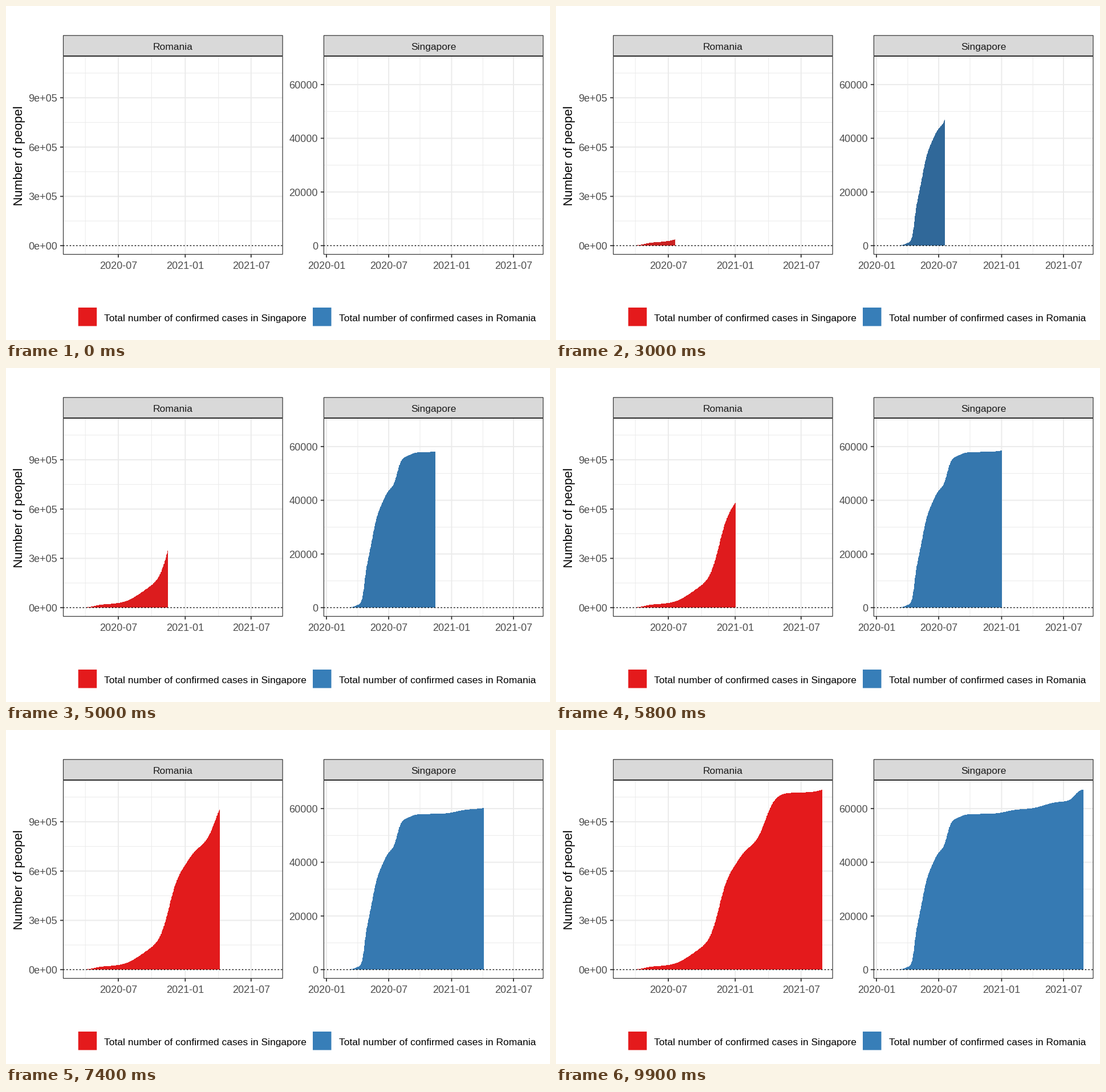
These frames come from a looping animation (954 px wide and 587 px high, 10000 ms). A matplotlib script:

```python
import numpy as np
import matplotlib.pyplot as plt
from matplotlib.animation import FuncAnimation
from matplotlib.patches import Polygon, Rectangle

W, H, DPI = 954, 587, 64
FRAMES, INTERVAL = 100, 100
FIRST_DAY, LAST_DAY = 22, 605            # days since 2020-01-01
START, DAYS_PER_FRAME = 23.3, 5.913
BASE_Y = 421.2
STRIP_TOP, STRIP_BOTTOM = 51.8, 87.5
PANEL_TOP, PANEL_BOTTOM, PANEL_WIDTH = 88.5, 436.5, 384.6
RED, BLUE = "#E41A1C", "#377EB8"
INK, AXIS_TEXT, GRID = "#333333", "#4D4D4D", "#EBEBEB"
HALF_YEARS = {"2020-01": 0, "2020-07": 182, "2021-01": 366, "2021-07": 547}

plt.rcParams["font.family"] = "Liberation Sans"
fig = plt.figure(figsize=(W / DPI, H / DPI), dpi=DPI, facecolor="white")
ax = fig.add_axes([0, 0, 1, 1])
ax.set_xlim(0, W)
ax.set_ylim(H, 0)
ax.axis("off")


def pt(px):
    return px * 72 / DPI


def line(x0, y0, x1, y1, color, width, z, **kw):
    ax.plot([x0, x1], [y0, y1], color=color, lw=pt(width), zorder=z,
            solid_capstyle="butt", snap=False, **kw)


def label(x, y, s, size=18, color=AXIS_TEXT, ha="center", **kw):
    ax.text(x, y, s, fontsize=pt(size), color=color, ha=ha, va="baseline",
            zorder=8, **kw)


def box(x0, y0, x1, y1, **kw):
    ax.add_patch(Rectangle((x0, y0), x1 - x0, y1 - y0, zorder=6, snap=False,
                           **kw))


def total_cases(waves):
    """Sum of logistic waves, each (thousands of cases, middle day, spread)."""
    days = np.arange(FIRST_DAY, LAST_DAY + 1)
    return sum(size / (1 + np.exp((mid - days) / spread))
               for size, mid, spread in waves)


class Panel:
    def __init__(self, left, title, waves, x0, per_day, per_k, color, dark):
        self.left, self.right = left, left + PANEL_WIDTH
        self.x0, self.per_day = x0, per_day
        self.color, self.dark = np.array(color) / 255, np.array(dark) / 255
        self.tops = np.round(BASE_Y - total_cases(waves) * per_k)
        self.area = Polygon(np.zeros((3, 2)), closed=True, lw=0,
                            antialiased=False, zorder=3)
        ax.add_patch(self.area)
        box(left, STRIP_TOP, self.right, STRIP_BOTTOM, fc="#D9D9D9", ec=INK,
            lw=pt(1.2))
        box(left, PANEL_TOP, self.right, PANEL_BOTTOM, fc="none", ec=INK,
            lw=pt(1.2))
        label((left + self.right) / 2, 77, title, 17.4, "#1A1A1A")
        line(left, BASE_Y, self.right, BASE_Y, "black", 1.5, 4,
             ls=(0, (1.3, 2.5)), dash_capstyle="butt")

    def x(self, day):
        return self.x0 + self.per_day * day

    def grid_y(self, step, names):
        for k, name in enumerate(names):
            y = BASE_Y - step * k
            line(self.left, y, self.right, y, GRID, 2, 1)
            line(self.left, y - step / 2, self.right, y - step / 2, GRID, 1, 1)
            line(self.left - 5.5, y, self.left, y, INK, 1.8, 5)
            label(self.left - 10.5, y + 6.7, name, ha="right")

    def grid_x(self):
        for name, day in HALF_YEARS.items():
            major, minor = self.x(day), self.x(day + 91.5)
            if major > self.left:
                line(major, PANEL_TOP, major, PANEL_BOTTOM, GRID, 2, 1)
                line(major, PANEL_BOTTOM, major, PANEL_BOTTOM + 5.5, INK, 1.8, 5)
                label(major, 462, name)
            if minor < self.right:
                line(minor, PANEL_TOP, minor, PANEL_BOTTOM, GRID, 1, 1)

    def grow(self, day, shade):
        n = day - FIRST_DAY + 1
        edges = np.round(self.x(np.arange(n + 1) + FIRST_DAY - .5))
        base = round(BASE_Y)
        ys = np.concatenate([[base], np.repeat(self.tops[:n], 2), [base]])
        self.area.set_xy(np.column_stack([np.repeat(edges, 2), ys]))
        self.area.set_facecolor(self.color * (1 - shade) + self.dark * shade)


ROMANIA = [(20, 117, 10), (125, 240, 22), (480, 322, 14), (120, 378, 12),
           (333, 449, 14), (46, 612, 15)]
SINGAPORE = [(.8, 82, 5), (12.2, 111, 3.5), (25.5, 134, 9.5), (6, 170, 7),
             (11.5, 207, 6), (2, 245, 9), (1.8, 380, 16), (2.9, 490, 18),
             (4.6, 580, 8)]

romania = Panel(100.5, "Romania", ROMANIA, 80.8, .638, .2888,
                (228, 26, 28), (70, 70, 60))
singapore = Panel(557.4, "Singapore", SINGAPORE, 562, .5996, 4.718,
                  (54, 122, 179), (15, 15, 20))
panels = (romania, singapore)

romania.grid_y(86.65, ("0e+00", "3e+05", "6e+05", "9e+05"))
singapore.grid_y(94.36, ("0", "20000", "40000", "60000"))
for p in panels:
    p.grid_x()

label(29.5, 351, "Number of peopel", 22.1, "black", "left", rotation=90,
      rotation_mode="anchor")
for x, color, country in ((126.7, RED, "Singapore"), (538, BLUE, "Romania")):
    box(x, 530, x + 32.5, 562.5, fc=color, ec="none")
    label(x + 45.5, 554, "Total number of confirmed cases in " + country,
          17.4, "black", "left")


def update(frame):
    day = min(LAST_DAY, int(START + DAYS_PER_FRAME * frame))
    shade = np.exp(-.06 * frame)         # fills begin dark and clear up
    for p in panels:
        p.grow(day, shade)
    return [p.area for p in panels]


anim = FuncAnimation(fig, update, frames=FRAMES, interval=INTERVAL,
                     repeat=True, repeat_delay=0, blit=False)
plt.show()
```
